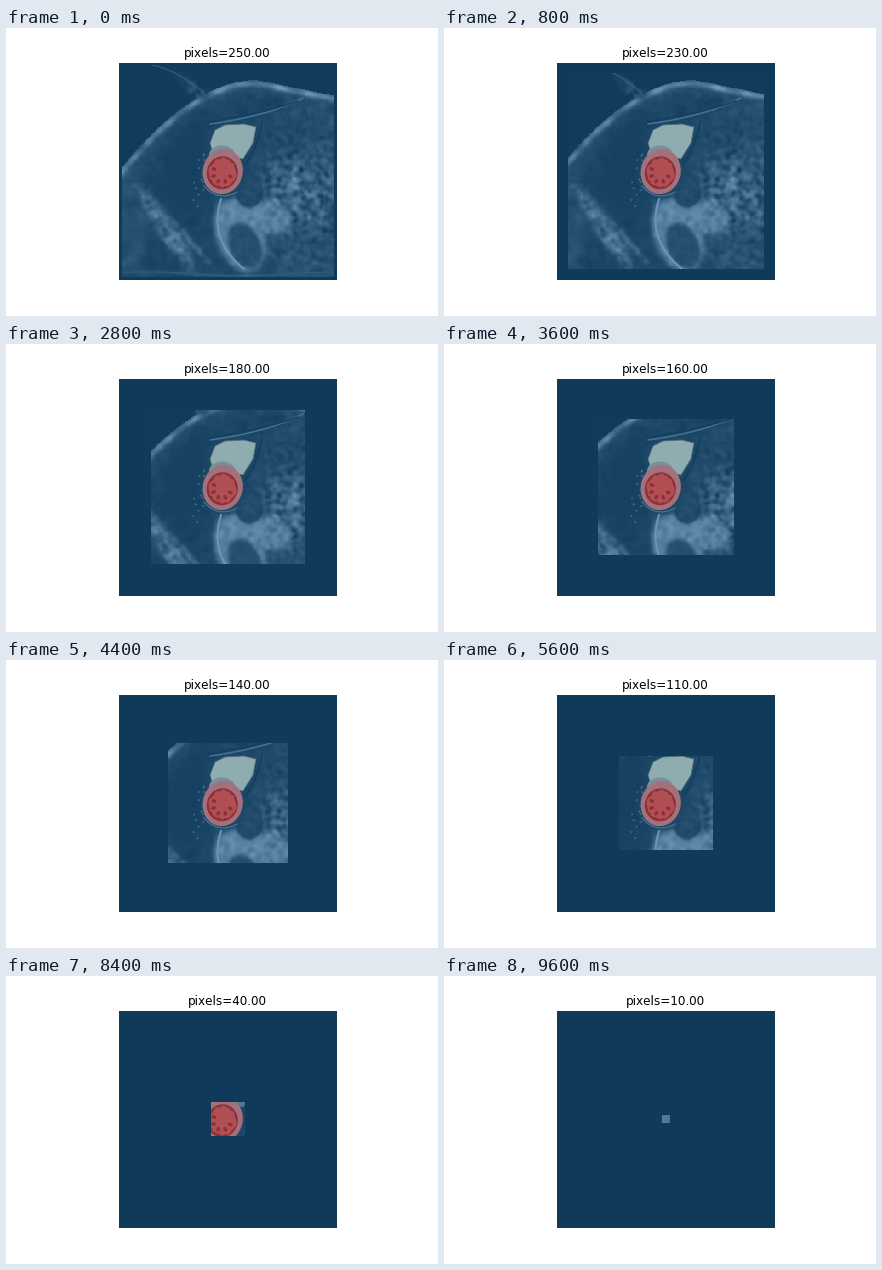
These frames come from a looping animation (432 by 288 pixels, 10 s). A matplotlib script:

```python
import numpy as np
import matplotlib.pyplot as plt
from matplotlib.animation import FuncAnimation
from matplotlib.patches import Ellipse, Polygon, Rectangle

W, H = 432, 288
CX, CY = 222, 143              # centre of the crop window
LEFT, TOP, WIDE, TALL = 113, 35, 218, 217
N = 256                        # scan resolution
SCALE = 217.44 / N             # screen pixels per scan pixel
DARK, LIGHT = np.array([16, 58, 89]), np.array([128, 172, 205])

plt.rcParams["font.family"] = "DejaVu Sans"
plt.rcParams["text.kerning_factor"] = 6
rng = np.random.default_rng(4)

X, Y = np.meshgrid(LEFT + (np.arange(N) + 0.5) * WIDE / N,
                   TOP + (np.arange(N) + 0.5) * TALL / N)


def tone(v):
    """Blue-tinted grey for brightness v in 0..1."""
    return (DARK + np.multiply.outer(v, LIGHT - DARK)) / 255


def noise(sigma):
    """Smooth random field with unit deviation."""
    f = np.fft.fftfreq(N)
    blur = np.exp(-2 * (np.pi * sigma) ** 2 * (f[:, None] ** 2 + f**2))
    field = np.fft.ifft2(np.fft.fft2(rng.normal(size=(N, N))) * blur).real
    return field / field.std()


def disc(x, y, w, h, angle=0, edge=0.06):
    """Elliptic mask with a soft edge."""
    a = np.radians(angle)
    u = (X - x) * np.cos(a) + (Y - y) * np.sin(a)
    v = (Y - y) * np.cos(a) - (X - x) * np.sin(a)
    q = np.hypot(2 * u / w, 2 * v / h)
    return 1 / (1 + np.exp(np.clip((q - 1) / edge, -30, 30)))


def bell(d, width):
    return np.exp(-((d / width) ** 2))


def mix(v, level, mask):
    return v + (level - v) * mask


def scan_image():
    fine, mid, coarse = noise(1), noise(2.2), noise(5)

    # depth below the curved chest wall
    reach = np.clip(250 - X, 0, None) / 133
    wall_y = 52 + 86 * reach**1.9 + 0.2 * np.clip(X - 250, 0, None)
    slope = np.gradient(wall_y, WIDE / N, axis=1)
    depth = (Y - wall_y) / np.hypot(1, slope)

    v = 0.1 + 0.012 * mid + 0.015 * coarse
    v = mix(v, 0.06, disc(180, 140, 44, 100, 10, 0.2))
    v = mix(v, 0.2 + 0.05 * coarse, disc(124, 195, 34, 120, -15, 0.2))

    # tissue on the right
    v = mix(v, 0.2 + 0.05 * mid, disc(308, 165, 120, 190))
    v = mix(v, 0.14 + 0.03 * mid, disc(285, 108, 78, 40, -35, 0.15))
    v = mix(v, 0.33 + 0.13 * mid, disc(293, 165, 72, 72, 0, 0.15))

    # chest wall and lower left muscle
    v = mix(v, 0.2 + 0.03 * mid, bell(depth, 13))
    v = mix(v, 0.58 + 0.13 * coarse, bell(depth - 3, 3.2))
    v = mix(v, 0.45 + 0.13 * mid, disc(160, 200, 92, 17, 56, 0.15))
    v = mix(v, 0.38 + 0.08 * mid, disc(183, 212, 54, 6, 48, 0.3))
    v = mix(v, 0.28, bell(Y - 246 - 2 * np.sin(X / 30), 1.4))

    # bright organ below the heart
    v = mix(v, 0.64 + 0.04 * mid, disc(234, 206, 48, 78, -18))
    v = mix(v, 0.6 + 0.06 * mid, disc(261, 190, 50, 32))
    v = mix(v, 0.18 + 0.02 * mid, disc(239, 218, 31, 48, -25))
    v = mix(v, 0.06, disc(243, 163, 27, 33))
    v = mix(v, 0.16 + 0.02 * mid, disc(243, 163, 24, 30))

    # heart
    v = mix(v, 0.12, disc(229, 112, 56, 42))
    v = mix(v, 0.12, disc(217, 145, 45, 53))
    v = mix(v, 0.56, disc(217, 144, 30, 33))

    air = mix(0.01, 0.2 + 0.1 * mid, disc(195, 65, 46, 13, 35, 0.2))
    v = np.where(depth > 0, v + 0.008 * fine, air)
    return np.clip(tone(np.clip(v, 0, 1)), 0, 1)


fig = plt.figure(figsize=(W / 72, H / 72), dpi=72, facecolor="white")
back = fig.add_axes([0, 0, 1, 1])
back.set_xlim(0, W)
back.set_ylim(H, 0)
back.axis("off")
back.add_patch(Rectangle((LEFT, TOP), WIDE, TALL, color="#103a59", lw=0))
title = fig.text(221.4 / W, 1 - 28.56 / H, "", size=12, ha="center")

scan = fig.add_axes([0, 0, 1, 1])
scan.axis("off")
scan.imshow(scan_image(), extent=(LEFT, LEFT + WIDE, TOP + TALL, TOP),
            aspect="auto", interpolation="nearest")


def oval(color, x, y, w, h, angle=0):
    return scan.add_patch(Ellipse((x, y), w, h, angle=angle, color=color, lw=0))


def streak(v, lw, start, bend, end):
    """Quadratic curve from start to end, pulled towards bend."""
    t = np.linspace(0, 1, 30)[:, None]
    p = (1 - t) ** 2 * np.array(start) + 2 * t * (1 - t) * np.array(bend) \
        + t**2 * np.array(end)
    scan.plot(*p.T, color=tone(v), lw=lw)


streak(0.3, 1.2, (146, 37), (178, 44), (203, 71))
streak(0.5, 1.5, (204, 96), (262, 88), (297, 70))
streak(0.04, 1.5, (207, 93), (262, 84), (292, 73))
streak(0.03, 1.5, (256, 94), (252, 118), (239, 137))
streak(0.8, 2, (215, 171), (202, 212), (238, 241))
streak(0.5, 1.2, (198, 158), (212, 174), (231, 164))
for x, y in rng.uniform((184, 122), (199, 182), (14, 2)):
    oval(tone(0.42), x, y, 2, 2)

# labels
pool = scan.add_patch(Polygon(
    [(204, 115), (209, 102), (219, 97), (238, 96), (250, 99), (247, 115),
     (237, 131), (222, 128), (206, 122)],
    edgecolor="#4d6c78", lw=0.8, joinstyle="round"))
dome = oval("#78909a", 216, 127, 26, 19)
wall = oval("#a2717c", 216.7, 143.5, 40, 45.5, 12)
rim = oval("#8f2f38", 216.3, 144.8, 31, 33, 12)

theta = np.linspace(0, 2 * np.pi, 40, endpoint=False)
radius = 13.7 + rng.uniform(-1.2, 0.8, theta.size)
cavity = scan.add_patch(Polygon(
    np.c_[216.5 + radius * np.cos(theta), 144.5 + 1.06 * radius * np.sin(theta)],
    color="#b05055", lw=0))
spots = [oval("#8f2f38", 216 + 9 * np.cos(a), 145 + 9 * np.sin(a), 5, 3.5,
              np.degrees(a)) for a in np.linspace(0.4, 3.6, 5)]
labels = [dome, wall, rim, cavity, *spots]


def draw(i):
    n = N - 6 - 10 * i
    title.set_text(f"pixels={n:.2f}")
    half = int(SCALE / 2 * n + 0.58)
    scan.set_position([(CX - half) / W, 1 - (CY + half) / H,
                       2 * half / W, 2 * half / H])
    scan.set_xlim(CX - half, CX + half)
    scan.set_ylim(CY + half, CY - half)

    # small crops lose the upper label, the smallest loses all
    found = n > 70
    pool.set_facecolor("#8fadb0" if found else tone(0.56))
    dome.set_facecolor("#78909a" if found else "#a2717c")
    for part in labels:
        part.set_visible(n > 10)
    return []


anim = FuncAnimation(fig, draw, frames=25, interval=400, repeat=True,
                     repeat_delay=0, blit=False)
plt.show()
```
